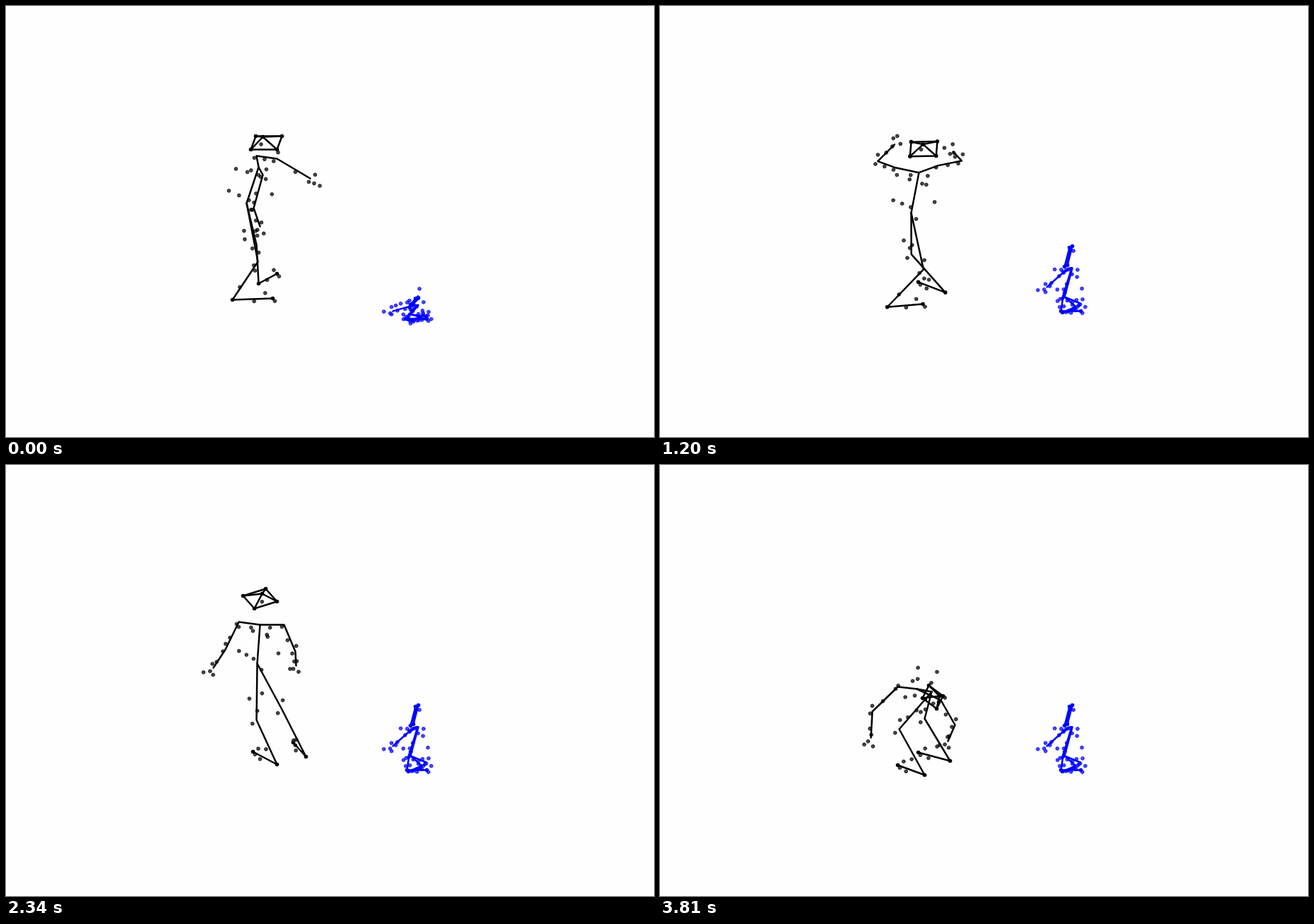
Write an HTML page with a canvas that moves like this. It is 917x611 px and loops after 3840 ms.

```html
<!DOCTYPE html>
<html lang="en">
<head>
<meta charset="utf-8">
<title>Marker skeletons</title>
<style>
html, body { margin: 0; width: 100%; height: 100%; overflow: hidden; background: #fefefe; }
canvas { display: block; }
</style>
</head>
<body>
<canvas id="stage" width="917" height="611"></canvas>
<script>
const LOOP = 3840, STEP = 30, GOLDEN_ANGLE = 2.4;
const ctx = document.getElementById('stage').getContext('2d');

const mix = (a, b, u) => a + (b - a) * u;
const along = (a, b, u) => a.map((v, k) => mix(v, b[k], u));

class Figure {
  constructor(rgb, scale) {
    this.color = `rgb(${rgb})`;
    this.markerColor = `rgba(${rgb},0.72)`;
    this.scale = scale;
    this.tracks = {};
  }
  // Limbs run outward from the body; head holds three corners and the nose.
  pose(time, parts) {
    for (const [name, points] of Object.entries(parts)) {
      (this.tracks[name] ||= []).push({ time, points });
    }
    return this;
  }
  // Both arms mirrored about x; each joint is [distance from x, y].
  mirrorArms(time, x, joints) {
    return this.pose(time, {
      armL: joints.map(([dx, y]) => [x - dx, y]),
      armR: joints.map(([dx, y]) => [x + dx, y])
    });
  }
}

const walker = new Figure('0,0,0', 1)
  .pose(0, {
    head: [[353, 184], [390, 184], [346, 203], [363, 185]],
    spine: [[357, 228], [340, 279]],
    armL: [[363, 239], [350, 286], [359, 312]],
    armR: [[354, 212], [383, 216], [430, 244]],
    legA: [[356, 362], [320, 416], [377, 414]],
    legB: [[354, 338], [357, 393], [383, 379]]
  })
  .mirrorArms(555, 361, [[31, 224], [78, 203], [116, 180]])
  .pose(750, {
    head: [[345, 205], [381, 205], [340, 225], [358, 208]],
    spine: [[358, 249], [355, 310]],
    armL: [[328, 247], [306, 289], [340, 286]],
    armR: [[392, 247], [428, 287], [413, 315]],
    legA: [[390, 378], [323, 427], [372, 425]],
    legB: [[352, 352], [409, 408], [364, 397]]
  })
  .mirrorArms(1500, 367, [[27, 214], [59, 182], [50, 147]])
  .pose(1680, {
    head: [[366, 178], [404, 176], [368, 199], [387, 182]],
    spine: [[374, 221], [355, 274]],
    armL: [[352, 210], [288, 201], [235, 185]],
    armR: [[393, 225], [439, 222], [484, 220]],
    legA: [[353, 365], [319, 425], [371, 416]],
    legB: [[363, 350], [397, 403], [368, 384]]
  })
  .mirrorArms(1770, 360, [[24, 218], [78, 230], [136, 242]])
  .pose(2340, {
    head: [[335, 185], [367, 175], [351, 203], [362, 182]],
    spine: [[359, 226], [355, 281]],
    armL: [[329, 222], [310, 261], [293, 287]],
    armR: [[393, 226], [409, 264], [410, 284]],
    legA: [[354, 361], [383, 424], [349, 406]],
    legB: [[390, 346], [424, 413], [406, 393]]
  })
  .pose(2820, {
    head: [[320, 206], [349, 205], [323, 230], [345, 220]],
    spine: [[356, 229], [374, 275]],
    armL: [[341, 243], [347, 286], [323, 323]],
    armR: [[370, 211], [393, 238], [386, 264]],
    legA: [[363, 363], [387, 426], [348, 411]],
    legB: [[396, 348], [423, 405], [375, 394]]
  })
  .pose(3360, {
    head: [[288, 320], [314, 328], [288, 340], [285, 338]],
    spine: [[334, 308], [421, 293]],
    armL: [[336, 323], [366, 360], [350, 400]],
    armR: [[314, 296], [335, 301], [361, 326]],
    legA: [[371, 361], [399, 425], [357, 412]],
    legB: [[404, 347], [435, 405], [384, 395]]
  })
  .pose(3810, {
    head: [[380, 312], [400, 327], [371, 330], [395, 327]],
    spine: [[363, 317], [384, 321]],
    armL: [[336, 314], [300, 349], [298, 386]],
    armR: [[397, 333], [417, 368], [407, 391]],
    legA: [[338, 374], [374, 439], [336, 425]],
    legB: [[374, 359], [410, 419], [365, 407]]
  });

const crouch = {
  head: [[579, 342], [583, 340], [572, 369], [580, 346]],
  spine: [[582, 371], [570, 410]],
  armL: [[579, 371], [567, 380], [547, 398]],
  armR: [[583, 371], [572, 412], [594, 421]],
  legA: [[570, 411], [567, 432], [595, 432]],
  legB: [[588, 426], [569, 434], [586, 428]]
};
// The second figure starts as the same crouch pressed flat.
const flattened = Object.fromEntries(Object.entries(crouch).map(([name, points]) =>
  [name, points.map(([x, y]) => [x, 436 + (y - 410) * 0.32])]));
const riser = new Figure('0,0,255', 0.75).pose(0, flattened).pose(630, crouch);

// Cubic easing through the keys that never overshoots a turning point.
function sample(track, time) {
  const last = track.length - 1;
  if (time >= track[last].time) return track[last].points;
  const i = track.findIndex((key, n) => time < track[n + 1].time);
  const a = track[i], b = track[i + 1];
  const span = b.time - a.time, u = (time - a.time) / span;

  const rate = (n, value) => (value(track[n + 1]) - value(track[n])) / (track[n + 1].time - track[n].time);
  const slope = (n, value) => {
    if (n === 0) return rate(0, value);
    if (n === last) return rate(last - 1, value);
    const before = rate(n - 1, value), after = rate(n, value);
    return before * after > 0 ? 2 * before * after / (before + after) : 0;
  };
  return a.points.map((point, p) => point.map((from, axis) => {
    const value = key => key.points[p][axis];
    return mix(from, value(b), u * u * (3 - 2 * u))
      + span * u * (1 - u) * ((1 - u) * slope(i, value) - u * slope(i + 1, value));
  }));
}

// Markers sit along a bone, fanned out around it by the golden angle.
function scatter(a, b, count, from, to, spread) {
  return Array.from({ length: count }, (_, n) => {
    const [x, y] = along(a, b, mix(from, to, (n + 0.5) / count));
    const angle = (n + 1) * GOLDEN_ANGLE, radius = spread * (0.6 + 0.4 * (n % 2));
    return [x + radius * Math.cos(angle), y + radius * Math.sin(angle)];
  });
}

function markersOf({ spine: [neck, hip], armL, armR, legA, legB }, scale) {
  const arm = ([shoulder, elbow, wrist]) => [
    ...scatter(neck, shoulder, 1, 1, 1, 7 * scale),
    ...scatter(shoulder, elbow, 1, 0.5, 0.5, 7 * scale),
    ...scatter(shoulder, elbow, 2, 0.95, 1.05, 9 * scale),
    ...scatter(elbow, wrist, 1, 0.6, 0.6, 5 * scale),
    ...scatter(elbow, wrist, 4, 1, 1.35, 9 * scale)
  ];
  const leg = ([knee, ankle, toe]) => [
    ...scatter(hip, knee, 1, 0.5, 0.5, 24 * scale),
    ...scatter(hip, knee, 2, 1, 1, 13 * scale),
    ...scatter(knee, ankle, 1, 0.6, 0.6, 9 * scale),
    ...scatter(ankle, toe, 3, 0.5, 1.1, 8 * scale)
  ];
  return [...scatter(neck, hip, 12, -0.2, 1, 30 * scale),
    ...arm(armL), ...arm(armR), ...leg(legA), ...leg(legB)];
}

function line(...points) {
  ctx.beginPath();
  points.forEach(([x, y]) => ctx.lineTo(x, y));
  ctx.stroke();
}

function dot([x, y], radius) {
  ctx.beginPath();
  ctx.arc(x, y, radius, 0, Math.PI * 2);
  ctx.fill();
}

function drawFigure(figure, time) {
  const body = {};
  for (const name in figure.tracks) body[name] = sample(figure.tracks[name], time);

  ctx.fillStyle = ctx.strokeStyle = figure.markerColor;
  ctx.lineWidth = 1;
  for (const marker of markersOf(body, figure.scale)) {
    dot(marker, 2.4);
    ctx.stroke();
  }

  ctx.fillStyle = ctx.strokeStyle = figure.color;
  ctx.lineWidth = 2.5;
  ctx.lineJoin = ctx.lineCap = 'round';
  const { head: [cornerA, cornerB, cornerD, nose], spine: [neck, hip], armL, armR, legA, legB } = body;
  const cornerC = cornerB.map((v, k) => v + cornerD[k] - cornerA[k]);
  const corners = [cornerA, cornerB, cornerC, cornerD];
  line(...corners, cornerA);
  for (const corner of corners) line(nose, corner);
  line(neck, hip);
  for (const arm of [armL, armR]) line(neck, ...arm);
  for (const leg of [legA, legB]) line(hip, ...leg);
  for (const joint of [...corners, nose, ...legA.slice(1), ...legB.slice(1)]) dot(joint, 2.8);
}

let start;
function draw(now) {
  start ??= now;
  const time = Math.floor((now - start) % LOOP / STEP) * STEP;
  ctx.setTransform(1, 0, 0, 1, 0, 0);
  ctx.fillStyle = '#fefefe';
  ctx.fillRect(0, 0, 917, 611);
  ctx.translate(0.5, 0.5); // joints lie on pixel centres
  drawFigure(walker, time);
  drawFigure(riser, time);
  requestAnimationFrame(draw);
}
requestAnimationFrame(draw);
</script>
</body>
</html>
```
